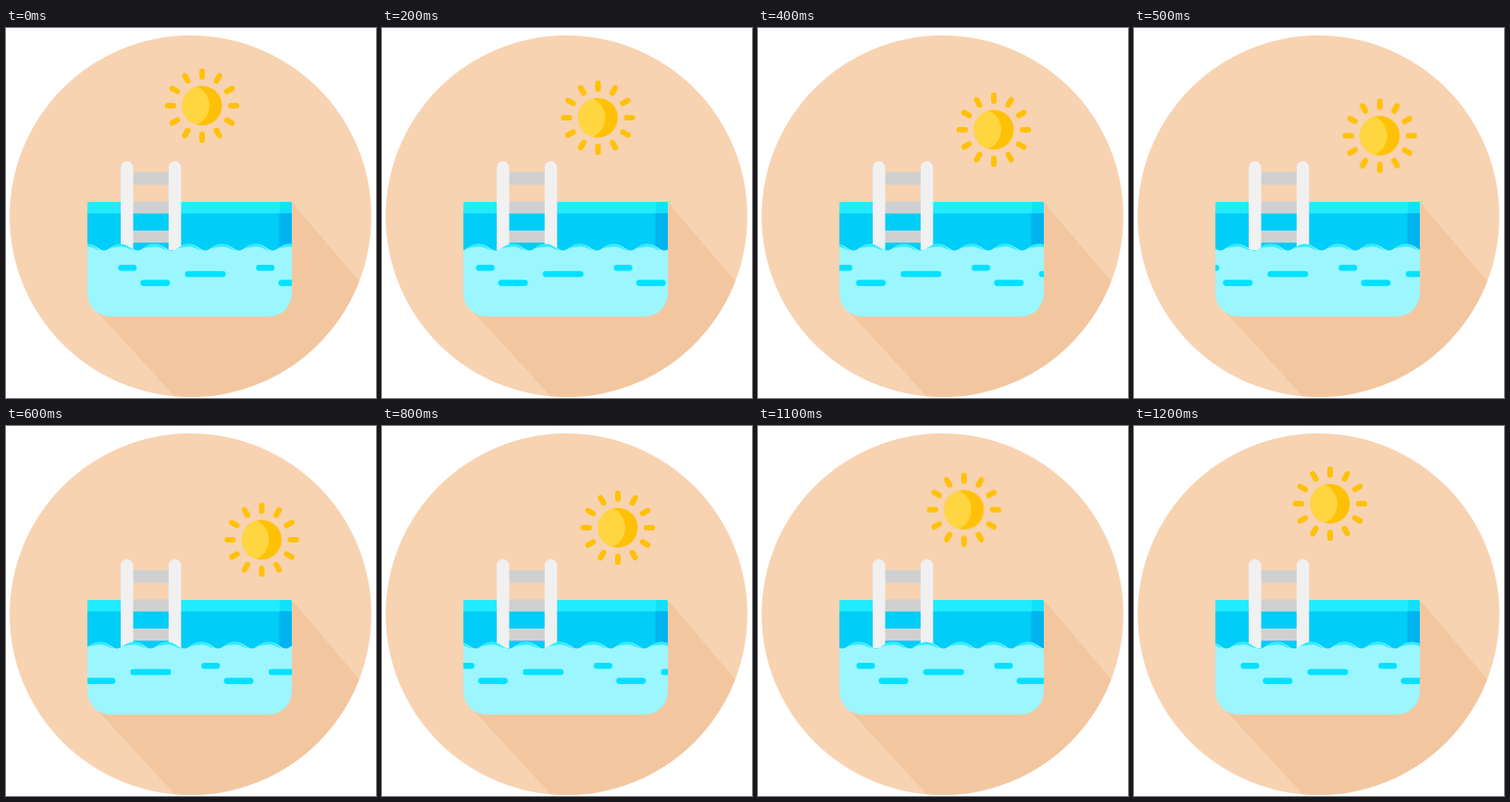
These frames come from a looping animation (400x400 px, 1300 ms). An HTML page:

```html
<!DOCTYPE html>
<html lang="en">
<head>
<meta charset="utf-8">
<title>Sunny pool</title>
<style>
  html, body { margin: 0; width: 100%; height: 100%; overflow: hidden; background: #fff; }
  svg { display: block; width: 100%; height: 100%; }
  #sun { animation: sun 1300ms infinite; }
  #water { animation: water 1300ms infinite; }
  /* Six steps out, then seven back; the seventh is where the loop restarts. */
  @keyframes sun {
    0% { transform: translate(212px, 84px); animation-timing-function: steps(6); }
    46.1538% { transform: translate(276.5px, 123px); animation-timing-function: steps(7); }
    100% { transform: translate(201.25px, 77.5px); }
  }
  @keyframes water {
    0% { transform: translateX(0); animation-timing-function: steps(6); }
    46.1538% { transform: translateX(-59px); animation-timing-function: steps(7); }
    100% { transform: translateX(2.8px); }
  }
</style>
</head>
<body>
<svg viewBox="0 0 400 400">
  <defs>
    <clipPath id="disc"><circle cx="199.5" cy="203.5" r="195.5"/></clipPath>
    <clipPath id="pool"><path d="M88 190q0-2 2-2H307q2 0 2 2V287a25 25 0 0 1-25 25H113a25 25 0 0 1-25-25z"/></clipPath>
  </defs>

  <g clip-path="url(#disc)">
    <rect width="400" height="400" fill="#f7d3b2"/>
    <path d="M308 187L394 288V400H184L95 303z" fill="#f2c7a0"/>
  </g>

  <g id="sun">
    <circle r="21.5" fill="#ffc107"/>
    <path d="M-6-20.65A21.5 21.5 0 0 0-6 20.65A22.3 22.3 0 0 0-6-20.65z" fill="#ffd640"/>
    <g id="rays" stroke="#ffc107" stroke-width="6" stroke-linecap="round"></g>
  </g>

  <g clip-path="url(#pool)">
    <rect x="88" y="188" width="221" height="13" fill="#22ebfe"/>
    <rect x="296" y="188" width="13" height="13" fill="#12e0fc"/>
    <rect x="88" y="200.5" width="221" height="60" fill="#00cdf8"/>
    <rect x="295.5" y="200.5" width="13.5" height="60" fill="#00b4f0"/>
  </g>

  <path d="M137 156h40v13.5h-40zM137 187.5h40v13h-40zM137 219h40v13h-40z" fill="#d0d0d0"/>
  <path d="M124 240V150.7a6.75 6.75 0 0 1 13.5 0V240zM175.8 240V150.7a6.75 6.75 0 0 1 13.5 0V240z" fill="#f1f1f1"/>

  <g clip-path="url(#pool)">
    <g id="water">
      <path id="body" fill="#9bf6ff"/>
      <path id="crests" fill="#26eefe"/>
      <path id="dashes" stroke="#00e1ff" stroke-width="6.6" stroke-linecap="round"/>
    </g>
  </g>
</svg>
<script>
  const el = id => document.getElementById(id);
  const waves = 9, left = 69.5, level = 240.5;

  el('body').setAttribute('d',
    `M${left} ${level}` + 'c5 0 9-7 18-7s13.5 7 18.5 7'.repeat(waves) + `V320H${left}z`);

  el('crests').setAttribute('d',
    `M${left + 6} ${level - 2}` +
    'c4-3 8-5 12-5c7 0 10.5 6 15.5 6.8c-6 0-9-4-14-4c-5 0-9 1-13.5 2.2zm36.5 0'.repeat(waves));

  // x, y and full width of each ripple
  const ripples = [
    [121.3, 259.3, 20], [145.3, 275.6, 32], [193.5, 266, 44],
    [270.3, 259.3, 20], [294.5, 275.6, 32], [343, 266, 44]
  ];
  el('dashes').setAttribute('d',
    ripples.map(([x, y, w]) => `M${x + 3.3} ${y}h${w - 6.6}`).join(''));

  el('rays').innerHTML = Array.from({ length: 12 }, (_, i) =>
    `<path d="M0-31V-37.3" transform="rotate(${i * 30})"/>`).join('');
</script>
</body>
</html>
```
